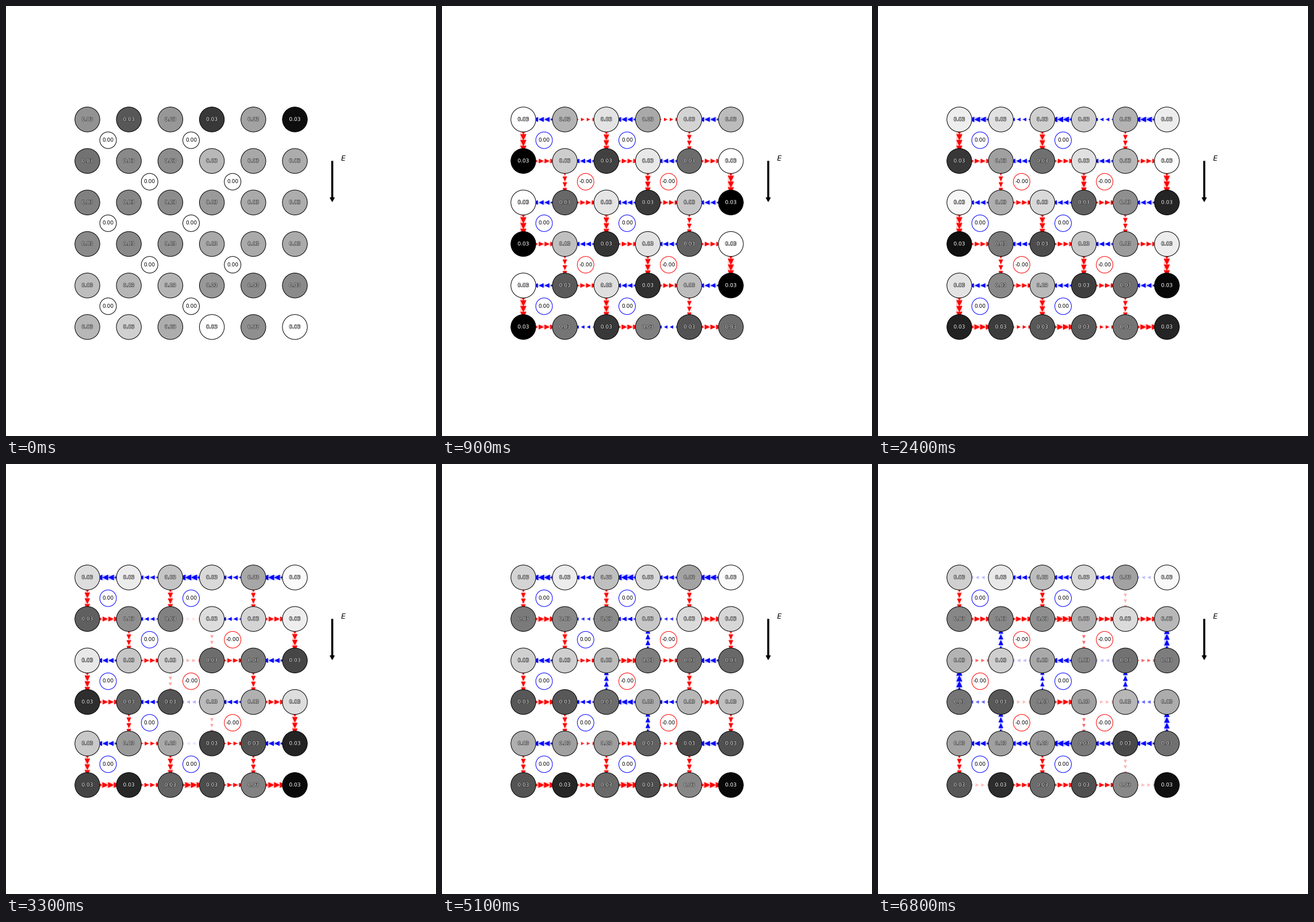
A matplotlib script for the animation above (6.9 s loop, 748 by 748 pixels).

```python
import numpy as np
import matplotlib.pyplot as plt
from matplotlib.animation import FuncAnimation
from matplotlib.collections import LineCollection, PolyCollection
from matplotlib.patches import Circle, Polygon, Rectangle
from matplotlib.patheffects import withStroke

SIZE, DPI = 748, 100
FRAMES, STEP = 69, 100
N, PITCH, X0, Y0 = 6, 72.2, 141.5, 197.4
NEUTRAL, FLASH = 149, 200
PX = 72 / DPI
RED, BLUE = (1, 0, 0), (0, 0, 1)

# Only the upper half is modelled: the lower half mirrors it,
# with opposite charges and opposite horizontal currents.
row, col = np.mgrid[:3, :N]
PARITY = np.where((row + col) % 2, -1, 1)
RING = np.minimum(col, 5 - col)     # 0 at the side walls, 2 in the centre
BOND = np.minimum(col, 4 - col)[:, :5]
BOND_COLS = np.array([[0, 2, 4], [1, 3, 5], [0, 2, 4]])

# Dipoles across the vertical bonds; the top rim's odd sites have none
EARLY_Q = PARITY * np.array([260, 85, 110])[RING]
EARLY_Q[0, 1::2] = 0

# Rim charge, with tilted inner rows and a dipole in the centre
c = np.arange(N)
dipole = 32 * ((c == 3) * 1 - (c == 2))
MID_Q = np.array([[69, 117, 46, 77, 15, 149],
                  29 * (c - 1.4) + dipole,
                  -32 * (c - 2.9) - dipole])
LATE_Q = MID_Q * np.where(row == 0, .9, np.where(RING == 1, 1, .35))

# Horizontal currents by row and distance from the wall, positive to the right
EARLY_H = -2.2 * PARITY[:, :5]
MID_H = np.array([[-3.2, -2.2, -3.4], [2.8, -.8, -2], [-2.7, 1.9, 2.8]])[row[:, :5], BOND]
LATE_H = np.array([[-.25, -2.2, -2.4], [2.6, 2.6, 3.4], [.6, -.25, -2.7]])[row[:, :5], BOND]

# Vertical currents, positive downwards
EARLY_V = np.array([3.5, 2.1, 3])[np.minimum(BOND_COLS, 5 - BOND_COLS)]
MID_V = np.full((3, 3), 2.3)
MID_V[1:, 1] *= -1
LATE_V = np.array([[2.2, 2.3, .3], [-2.4, .6, -3], [-3.4, -1.8, -2.3]])


def ramp(t, a, b):
    return np.clip((t - a) / (b - a), 0, 1)


def smooth(u):
    return u * u * (3 - 2 * u)


def mix(a, b, w):
    return a + (b - a) * w


def drift(t):
    return np.sin(np.pi / 2 * ramp(t, 200, 4200))


def noisy_start():
    r, c = np.mgrid[:N, :N]
    g = np.where(r < 4, 130 + 9 * c, 190 - 12 * c) + np.random.default_rng(3).normal(0, 8, (N, N))
    g[0, 1::2] -= 32 * c[0, 1::2]
    g[5, 1::2] += 32 * c[5, 1::2]
    return np.clip(g, 0, 255) / 255


def greys(t):
    if t == 0:
        return noisy_start()
    q = mix(EARLY_Q, MID_Q, drift(t))
    q = mix(q, LATE_Q, np.sin(np.pi / 2 * ramp(t, 4200, 6800)))
    q = np.vstack([q, -q[::-1]])
    light = np.interp(q, [0, 70, 149], [0, 67, 106])
    return np.clip(NEUTRAL + np.where(q > 0, light, q), 0, 255) / 255


def currents(t):
    """Currents of the whole lattice: across (6 x 5) and down (5 x 3)."""
    rim, bulk = drift(t), smooth(ramp(t, 2400, 4200))
    late = smooth(ramp(t, 5100, 6800))
    h = mix(EARLY_H, MID_H, np.where(row[:, :5] == 0, rim, bulk))
    h = mix(h, LATE_H, late) * mix(.06, 1, ramp(t, 200, 900))
    v = mix(mix(EARLY_V, MID_V, bulk), LATE_V, late)
    return np.vstack([h, -h[::-1]]), np.vstack([v, v[1::-1]])


def site(r, c):
    return np.array([X0 + PITCH * c, Y0 + PITCH * r])


def bonds(h, v):
    """Yield midpoint, axis and current of every bond."""
    for (r, c), i in np.ndenumerate(h):
        yield site(r, c + .5), np.array([1, 0]), i
    for (r, k), i in np.ndenumerate(v):
        yield site(r + .5, 2 * k + r % 2), np.array([0, 1]), i


def circulation(h, v, r, k):
    """Anticlockwise current around one brick of the lattice."""
    c = 2 * k + r % 2
    return v[r, k] - v[r, k + 1] + h[r + 1, c:c + 2].sum() - h[r, c:c + 2].sum()


fig = plt.figure(figsize=(SIZE / DPI, SIZE / DPI), dpi=DPI, facecolor="white")
ax = fig.add_axes([0, 0, 1, 1])
ax.set(xlim=(0, SIZE), ylim=(SIZE, 0))
ax.axis("off")

bands = LineCollection([], zorder=1, capstyle="butt")
heads = PolyCollection([], zorder=2, linewidths=0)
ax.add_collection(bands, autolim=False)
ax.add_collection(heads, autolim=False)

label = dict(ha="center", va="center", fontsize=9 * PX, zorder=5)
outline = [withStroke(linewidth=PX, foreground="black")]
sites = []
for r in range(N):
    for c in range(N):
        x, y = site(r, c)
        sites.append(ax.add_patch(Circle((x, y), 21.66, ec="black", lw=PX, zorder=3)))
        ax.text(x, y, "0.03", color="white", path_effects=outline, **label)

cells = []
for r in range(N - 1):
    for k in range(2):
        x, y = site(r + .5, 2 * k + .5 + r % 2)
        ring = ax.add_patch(Circle((x, y), 14.44, fc="white", lw=PX, zorder=3))
        cells.append((r, k, ring, ax.text(x, y, "", color="black", **label)))

shades = [ax.add_patch(Rectangle((x, 175.7), w, 404.3, fc="black", alpha=.21, lw=0, zorder=4))
          for x, w in ((119.8, 15.4), (510, 14.2))]

# Field arrow
ax.add_patch(Rectangle((565.7, 269.4), 3.6, 66, fc="black", lw=0, snap=False))
ax.add_patch(Polygon([(564, 333.5), (571, 333.5), (567.5, 340)], fc="black",
                     ec="black", lw=1.5 * PX, joinstyle="round"))
ax.text(586.5, 265.5, "E", style="italic", fontsize=12.5 * PX, ha="center", va="center")


def update(i):
    t = i * STEP
    for disc, g in zip(sites, greys(t).ravel()):
        disc.set_facecolor((g, g, g))

    h, v = currents(t)
    lines, widths, tints, tris, fills = [], [], [], [], []
    for mid, axis, flow in bonds(h, v):
        rgb, mag = (RED if flow > 0 else BLUE), abs(flow)
        along, side = axis * np.sign(flow), axis[::-1]
        half = (6 + 1.9 * max(mag - 1, 0)) / 2
        lines.append([mid - 18 * axis, mid + 18 * axis])
        widths.append(4 * max(mag - 1, 0) * PX)
        tints.append((*rgb, .2))
        for s in (-15, -5, 5, 15):
            tip, base = mid + (s + half) * along, mid + (s - half) * along
            tris.append([tip, base + half * side, base - half * side])
            fills.append((*rgb, min(mag, 1)))
    bands.set_segments(lines)
    bands.set_linewidths(widths)
    bands.set_color(tints)
    heads.set_verts(tris)
    heads.set_facecolor(fills)
    bands.set_visible(t > 0)
    heads.set_visible(t > 0)

    for r, k, ring, text in cells:
        spin = np.sign(circulation(h, v, r, k)) if t else 0
        ring.set_edgecolor({0: "black", 1: BLUE, -1: RED}[int(spin)])
        text.set_text("-0.00" if spin < 0 else "0.00")
    for shade in shades:
        shade.set_visible(t == FLASH)
    return []


anim = FuncAnimation(fig, update, frames=FRAMES, interval=STEP, repeat=True, repeat_delay=0)
plt.show()
```
